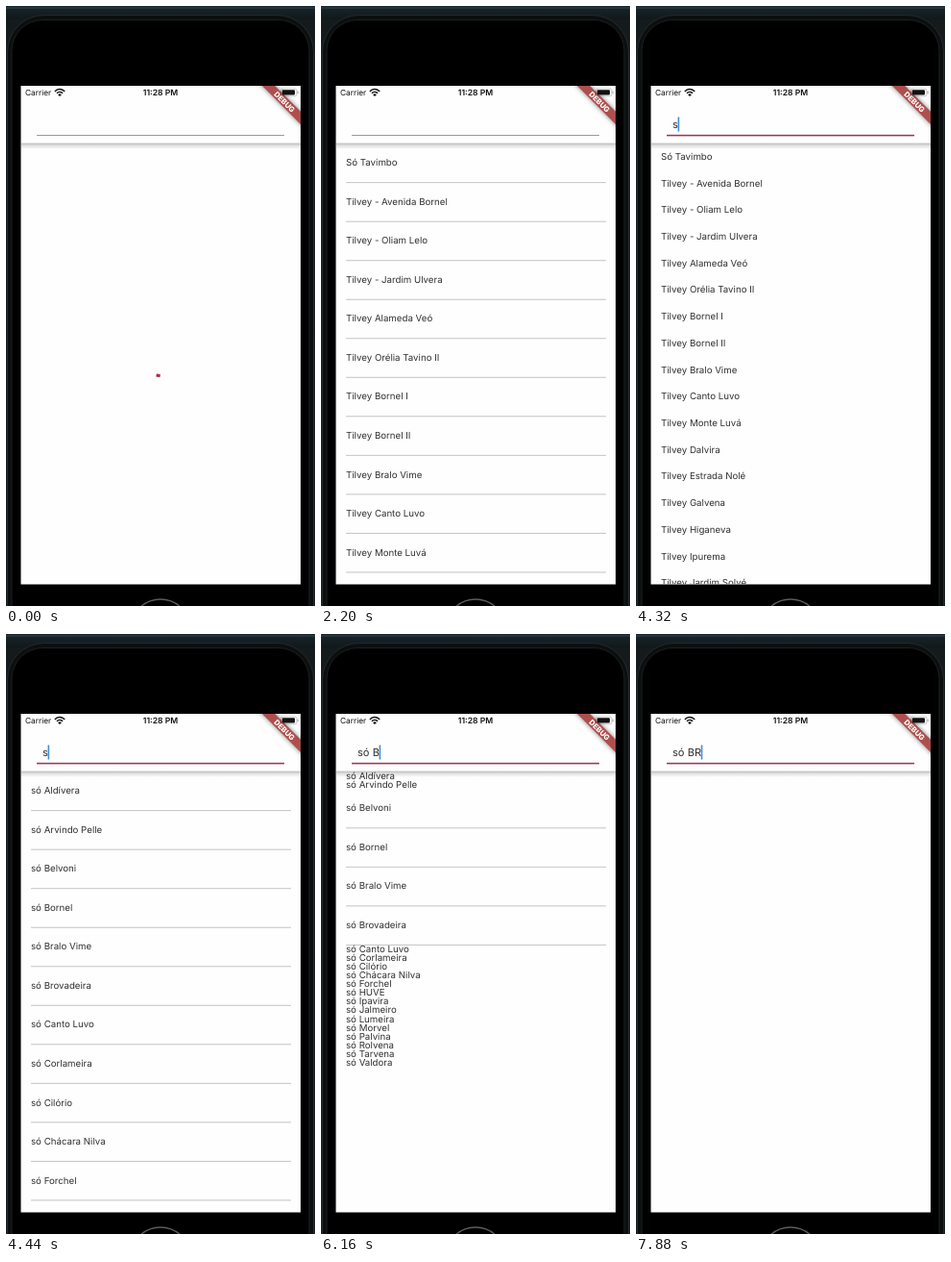
Recreate the animation shown at these times as an HTML page with a canvas. Size 322 by 624 pixels, loop 8 s.

```html
<!DOCTYPE html>
<html lang="pt">
<head>
<meta charset="utf-8">
<style>
  html, body { margin: 0; width: 100%; height: 100%; overflow: hidden; background: #000; }
  canvas { display: block; width: 322px; height: 624px; }
</style>
</head>
<body>
<canvas id="stage" width="322" height="624"></canvas>
<script>
const ctx = document.getElementById('stage').getContext('2d');
const LOOP = 8000;
const SCREEN = { x: 15.5, y: 83, w: 291.5, h: 518.5 };
const RIGHT = SCREEN.x + SCREEN.w, BOTTOM = SCREEN.y + SCREEN.h;
const BODY_TOP = 143, ROW = 40.53;
const LOADED = 800, FOCUSED = 2200;

const clinics = ['- Avenida Bornel', '- Oliam Lelo', '- Jardim Ulvera', 'Alameda Veó',
  'Orélia Tavino II', 'Bornel I', 'Bornel II', 'Bralo Vime', 'Canto Luvo', 'Monte Luvá',
  'Dalvira', 'Estrada Nolé', 'Galvena', 'Higaneva', 'Ipurema', 'Jardim Solvé', 'Lumaré I',
  'Lumaré II', 'Morvale', 'Nova Tilena', 'Parque Dovel', 'Ponte Larva', 'Rilvano',
  'Santa Olvina', 'Tarvilo', 'Vila Norena'];
const units = ['Aldívera', 'Arvindo Pelle', 'Belvoni', 'Bornel', 'Bralo Vime', 'Brovadeira',
  'Canto Luvo', 'Corlameira', 'Cilório', 'Chácara Nilva', 'Forchel', 'HUVE', 'Ipavira',
  'Jalmeiro', 'Lumeira', 'Morvel', 'Palvina', 'Rolvena', 'Tarvena', 'Valdora'];
const names = ['Só Tavimbo', ...clinics.map(n => 'Tilvey ' + n), ...units.map(n => 'só ' + n)];

const queries = [[4280, 's'], [4600, 'só'], [5560, 'só '], [6040, 'só B'], [7720, 'só BR']];
// [start, target opacity] of each cursor blink
const blinks = [[2840, 0], [3320, 1], [3760, 0], [4240, 1], [5200, 0], [6640, 0], [7120, 1], [7560, 0]];

const clamp = v => Math.min(1, Math.max(0, v));

function bezierEase(x1, y1, x2, y2) {
  const at = (a, b, s) => 3 * a * s * (1 - s) ** 2 + 3 * b * s * s * (1 - s) + s ** 3;
  return x => {
    let lo = 0, hi = 1;
    for (let i = 0; i < 20; i++) {
      const mid = (lo + hi) / 2;
      if (at(x1, x2, mid) < x) lo = mid; else hi = mid;
    }
    return at(y1, y2, lo);
  };
}
const fastOutSlowIn = bezierEase(0.4, 0, 0.2, 1);

function text(str, x, y, size, color, weight = 400, align = 'left') {
  ctx.font = `${weight} ${size}px Inter, sans-serif`;
  ctx.textAlign = align;
  ctx.fillStyle = color;
  ctx.fillText(str, x, y);
}

function box(x, y, w, h, color) {
  ctx.fillStyle = color;
  ctx.fillRect(x, y, w, h);
}

function roundBox(x, y, w, h, r) {
  ctx.beginPath();
  ctx.roundRect(x, y, w, h, r);
}

function drawPhone() {
  box(0, 0, 322, 624, '#151b1c');
  const top = ctx.createLinearGradient(0, 0, 0, 14);
  top.addColorStop(0, '#17262d');
  top.addColorStop(1, '#12181a');
  box(0, 0, 322, 14, top);
  box(0, 1.5, 322, 1, '#3a4444');
  roundBox(1.5, 9.5, 319, 680, 38);
  ctx.fillStyle = '#0c0f0f';
  ctx.fill();
  ctx.lineWidth = 1;
  ctx.strokeStyle = '#242a2a';
  ctx.stroke();
  roundBox(6, 14.5, 310, 680, 32);
  ctx.fillStyle = '#000';
  ctx.fill();
  ctx.strokeStyle = '#1d2020';
  ctx.stroke();
  ctx.beginPath();
  ctx.arc(161, 648, 31, 0, 2 * Math.PI);
  ctx.lineWidth = 1.3;
  ctx.strokeStyle = '#5c5c5c';
  ctx.stroke();
}

function drawSpinner(t) {
  const cycle = (Math.min(t, 700) + 920) / 1000;
  const step = Math.floor(cycle), turn = cycle - step;
  const head = fastOutSlowIn(clamp(turn * 2));
  const tail = fastOutSlowIn(clamp(turn * 2 - 1));
  const start = Math.PI * (-0.5 + tail * 1.5 + turn * 1.7 - step * 0.8);
  const sweep = Math.max((head - tail) * 1.5 * Math.PI, 0.001);
  ctx.beginPath();
  ctx.arc(161, 370.5, 14, start, start + sweep);
  ctx.lineWidth = 3.1;
  ctx.lineCap = 'square';
  ctx.strokeStyle = '#ad2b49';
  ctx.stroke();
  ctx.lineCap = 'butt';
}

// Remaining share of a row's height once the query stops matching it
function rowShare(name, t) {
  const miss = queries.find(([at, query]) => t >= at && !name.startsWith(query));
  return miss ? 1 - clamp((t - miss[0] + 14) / 174) : 1;
}

function drawList(t) {
  let y = BODY_TOP;
  for (const name of names) {
    const share = rowShare(name, t), h = ROW * share;
    if (h > 0) {
      ctx.save();
      ctx.beginPath();
      ctx.rect(SCREEN.x, y, SCREEN.w, h);
      ctx.clip();
      text(name, 26, y + h / 2 + 3, 9.7, '#303030');
      ctx.restore();
      if (share === 1) box(26, y + ROW - 0.4, 271, 1, '#c4c4c4');
    }
    y += h;
    if (y > BOTTOM) break;
  }
}

function cursorOpacity(t) {
  const typed = queries.filter(q => q[0] <= t).pop();
  const blink = blinks.filter(b => b[0] <= t).pop();
  if (!blink || (typed && typed[0] > blink[0])) return 1;
  const p = clamp((t - blink[0] + 35) / 195);
  return blink[1] ? p : 1 - p;
}

function drawField(t) {
  const focus = fastOutSlowIn(clamp((t - FOCUSED) / 200));
  const typed = queries.filter(q => q[0] <= t).pop();
  const query = typed ? typed[1] : '';
  const mix = (a, b) => Math.round(a + (b - a) * focus);
  const h = 0.9 + 0.65 * focus;
  box(32, 134.6 - h / 2, 258, h, `rgb(${mix(140, 151)},${mix(140, 54)},${mix(140, 88)})`);
  if (query) {
    text(query, 38, 126.5, 11.1, '#303030');
  } else {
    ctx.globalAlpha = focus;
    text('Pesquisar', 38, 126.5, 11.1, '#757575');
    ctx.globalAlpha = 1;
  }
  if (t >= FOCUSED + 40) {
    ctx.font = '400 11.1px Inter, sans-serif';
    ctx.globalAlpha = cursorOpacity(t);
    box(37.7 + ctx.measureText(query).width, 115.5, 1.6, 15, '#3f8fd6');
    ctx.globalAlpha = 1;
  }
}

function drawBanner() {
  ctx.save();
  ctx.translate(RIGHT, SCREEN.y);
  ctx.rotate(Math.PI / 4);
  ctx.shadowColor = 'rgba(0,0,0,0.5)';
  ctx.shadowBlur = 5;
  box(-40, 19, 80, 9.3, '#ae4f4d');
  ctx.shadowColor = 'transparent';
  text('DEBUG', 0, 26.5, 7.7, '#fff', 800, 'center');
  ctx.restore();
}

function drawStatus() {
  text('Carrier', 20, 93.4, 8.3, '#111');
  text('11:28 PM', 161, 93.4, 8.6, '#111', 600, 'center');
  ctx.strokeStyle = '#111';
  ctx.lineWidth = 1.5;
  for (const r of [4, 6.8]) {
    ctx.beginPath();
    ctx.arc(56, 93.4, r, -Math.PI * 0.77, -Math.PI * 0.23);
    ctx.stroke();
  }
  ctx.beginPath();
  ctx.moveTo(56, 94);
  ctx.arc(56, 94, 2.5, -Math.PI * 0.77, -Math.PI * 0.23);
  ctx.fillStyle = '#111';
  ctx.fill();
}

function drawBattery() {
  roundBox(286.5, 86, 16.5, 7.8, 2);
  ctx.lineWidth = 0.7;
  ctx.strokeStyle = 'rgba(0,0,0,0.3)';
  ctx.stroke();
  roundBox(287.8, 87.2, 13.2, 5.4, 1);
  ctx.fillStyle = '#111';
  ctx.fill();
  box(303.6, 88.6, 1, 2.6, 'rgba(0,0,0,0.35)');
}

function draw(t) {
  drawPhone();
  // One opaque pass softens the screen edge; later layers stay inside it
  box(SCREEN.x, SCREEN.y, SCREEN.w, SCREEN.h, '#fefefe');
  ctx.save();
  ctx.beginPath();
  ctx.rect(16, SCREEN.y, RIGHT - 16, 518);
  ctx.clip();
  if (t < LOADED) drawSpinner(t); else drawList(t);
  const shade = ctx.createLinearGradient(0, BODY_TOP - 1, 0, BODY_TOP + 6);
  shade.addColorStop(0, 'rgba(0,0,0,0.32)');
  shade.addColorStop(0.4, 'rgba(0,0,0,0.13)');
  shade.addColorStop(1, 'rgba(0,0,0,0)');
  box(16, BODY_TOP - 0.6, SCREEN.w, 7, shade);
  box(16, SCREEN.y, SCREEN.w, BODY_TOP - 0.6 - SCREEN.y, '#fefefe');
  drawField(t);
  drawStatus();
  drawBanner();
  drawBattery();
  ctx.restore();
}

ctx.textRendering = 'geometricPrecision';
const begin = performance.now();
function frame() {
  draw((performance.now() - begin) % LOOP);
  requestAnimationFrame(frame);
}
frame();
</script>
</body>
</html>
```
